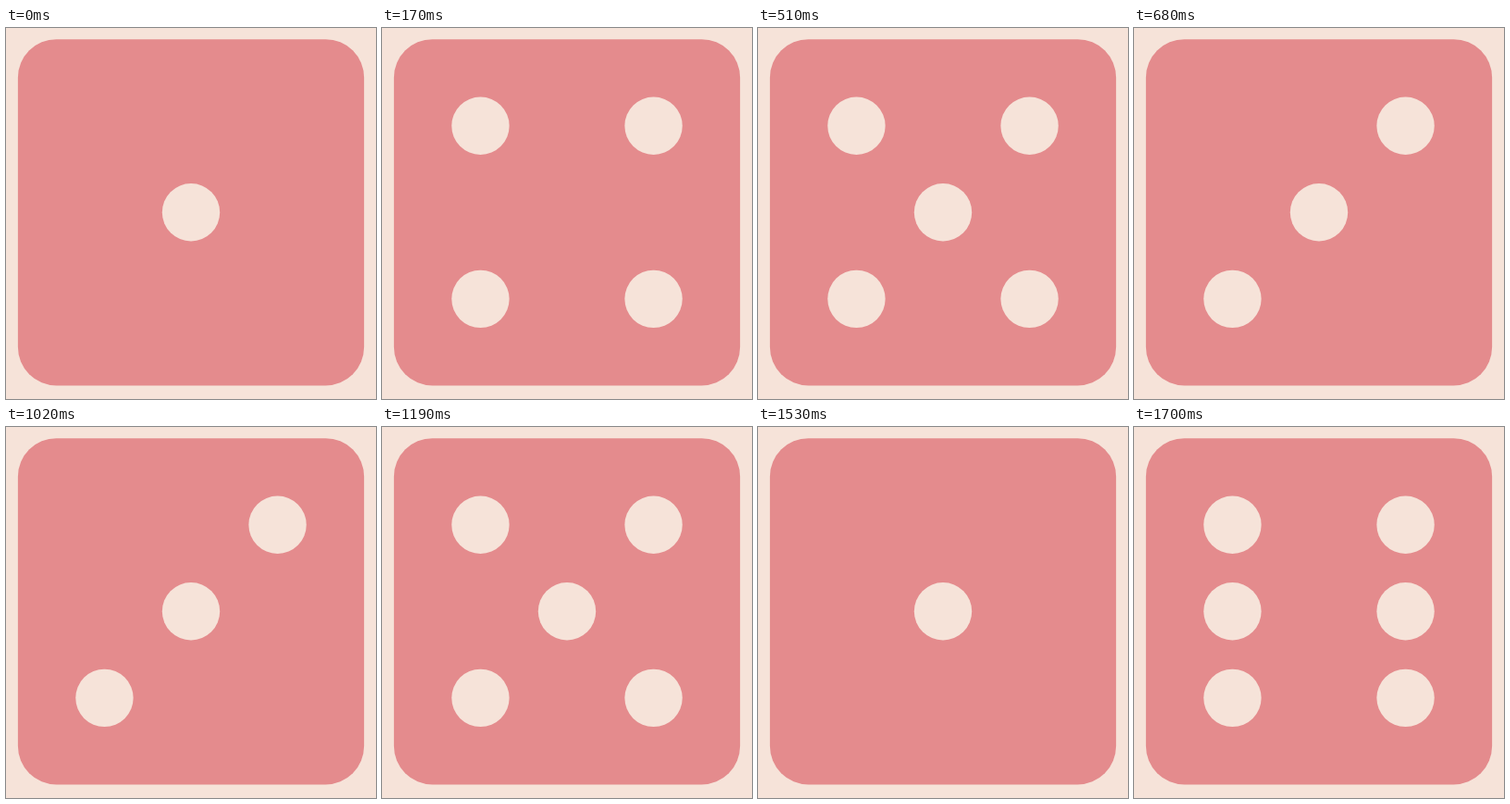
An HTML page that plays this animation: 400 by 401 pixels, repeating every 1.87 s.

```html
<!DOCTYPE html>
<html lang="en">
<head>
<meta charset="utf-8">
<title>Rolling die</title>
<style>
  html, body { margin: 0; width: 100%; height: 100%; overflow: hidden; background: #f6e3d9; }
  svg { display: block; width: 100%; height: 100%; }
</style>
</head>
<body>
<svg viewBox="0 0 400 401">
  <!-- The die is 18 units wide, centred on the origin -->
  <g transform="translate(200 199.3) scale(20.79)">
    <rect x="-9" y="-9" width="18" height="18" rx="2" fill="#e48b8d"/>
    <g id="pips" fill="#f6e3d9"></g>
  </g>
</svg>
<script>
const STEP = 170;
const ROLLS = '14253235416';
const GAP = 4.5;
const pips = document.getElementById('pips');

function hasPip(face, col, row) {
  if (row === 0) return col === 0 ? face % 2 === 1 : face === 6;
  return face > (col === -row ? 1 : 3);
}

function addPip(col, row) {
  const dot = document.createElementNS('http://www.w3.org/2000/svg', 'circle');
  dot.setAttribute('cx', col * GAP);
  dot.setAttribute('cy', row * GAP);
  dot.setAttribute('r', 1.5);
  pips.append(dot);
  return { dot, col, row };
}

const grid = [];
for (let row = -1; row <= 1; row++) {
  for (let col = -1; col <= 1; col++) {
    if (col || !row) grid.push(addPip(col, row));
  }
}

function show(time) {
  const face = Number(ROLLS[Math.floor(time / STEP) % ROLLS.length]);
  for (const { dot, col, row } of grid) {
    dot.setAttribute('visibility', hasPip(face, col, row) ? 'visible' : 'hidden');
  }
}

const start = performance.now();
function tick() {
  show(performance.now() - start);
  requestAnimationFrame(tick);
}
tick();
</script>
</body>
</html>
```
